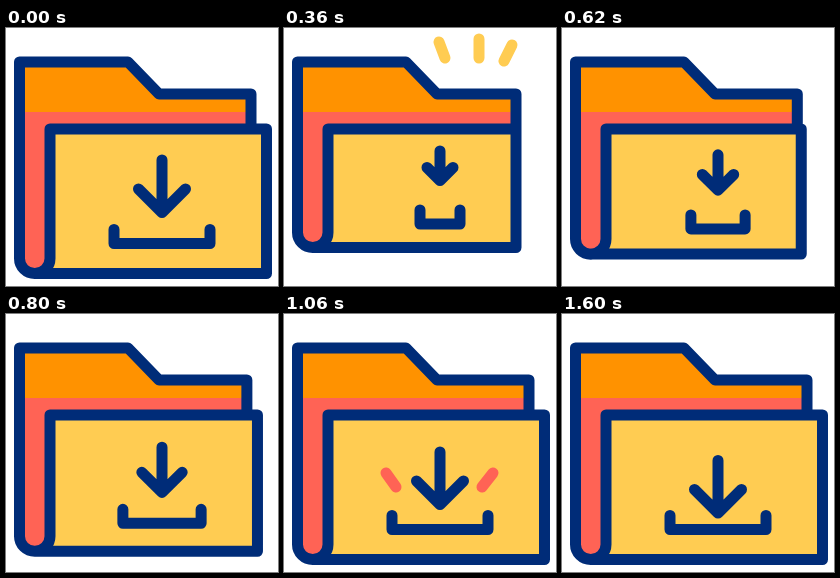
These frames come from a looping animation (272x258 px, 2400 ms). An HTML page:

```html
<!DOCTYPE html>
<html lang="en">
<head>
<meta charset="utf-8">
<title>Download folder</title>
<style>
  html, body { margin: 0; height: 100%; overflow: hidden; background: #fff; }
  svg { display: block; width: 100vw; height: 100vh; }
  path { fill: none; stroke-width: 11; stroke-linecap: round; stroke-linejoin: round; }
  .ink { stroke: #002c78; }
  #glow { stroke: #ffcc52; }
  #burst { stroke: #ff6355; }
</style>
</head>
<body>
<svg viewBox="0 0 272 258">
  <path id="back" style="fill:#ff6355"/>
  <path id="tab" style="fill:#ff9200"/>
  <path id="front" style="fill:#ffcc52"/>
  <path id="outline" class="ink"/>
  <path id="tray" class="ink"/>
  <path id="arrow" class="ink"/>
  <path id="glow"/>
  <path id="burst"/>
</svg>
<script>
const LOOP = 2400;
const glowRays = [[161, 30, 155, 14], [195, 30, 195, 11], [220, 33, 228, 17]];
const burstRays = [[112, 173, 102, 159], [198, 173, 209, 159]];

const mix = (a, b, p) => a + (b - a) * p;
const ramp = (t, from, to) => Math.min(1, Math.max(0, (t - from) / (to - from)));
const ease = (t, from, to) => {
  const x = ramp(t, from, to);
  return x * x * (3 - 2 * x);
};
const draw = (id, d) => document.getElementById(id).setAttribute('d', d);

// Rays grow outward, then their inner end catches up
function rays(list, t, start) {
  const head = ease(t, start, start + 100);
  const tail = ease(t, start + 100, start + 200);
  if (head <= tail) return '';
  return list.map(([x1, y1, x2, y2]) =>
    `M${mix(x1, x2, tail)} ${mix(y1, y2, tail)}L${mix(x1, x2, head)} ${mix(y1, y2, head)}`).join('');
}

function render(t) {
  const open = t < 400 ? 1 - ease(t, 0, 340) : ease(t, 420, 1030);
  const right = mix(232, 260.5, open);
  const bottom = mix(219.5, 245.5, open);
  const backRight = mix(232, 245, open);
  const fold = bottom - 15;
  const foldArc = `V${fold}a15.2 15 0 0 1-30.5 0`;

  draw('back', `M44 84${foldArc}V84H${backRight}V101H44Z`);
  draw('tab', `M13.5 84V34H122L153 66H${backRight}V84Z`);
  draw('front', `M44 101H${right}V${bottom}H29A15 15 0 0 0 44 ${fold}Z`);
  draw('outline', `M29 ${bottom}H${right}V101H44${foldArc}V34H122L153 66H${backRight}V101`);

  const half = mix(20, 48, open);
  const base = mix(196, 215.5, open);
  draw('tray', `M${156 - half} ${base - 14}V${base}H${156 + half}V${base - 14}`);

  const bob = t < 400 ? -6 * open : -6 * ease(t, 1060, 1200) + 14.5 * ease(t, 1200, 1600);
  const top = mix(123, 138, open) + bob;
  const tip = mix(152.5, 190.5, open) + bob;
  const wing = mix(13, 23.5, open);
  draw('arrow', `M156 ${top}V${tip}M${156 - wing} ${tip - wing}L156 ${tip}L${156 + wing} ${tip - wing}`);

  draw('glow', rays(glowRays, t, 260));
  draw('burst', rays(burstRays, t, 960));
}

const begin = performance.now();
function tick() {
  render((performance.now() - begin) % LOOP);
  requestAnimationFrame(tick);
}
tick();
</script>
</body>
</html>
```
